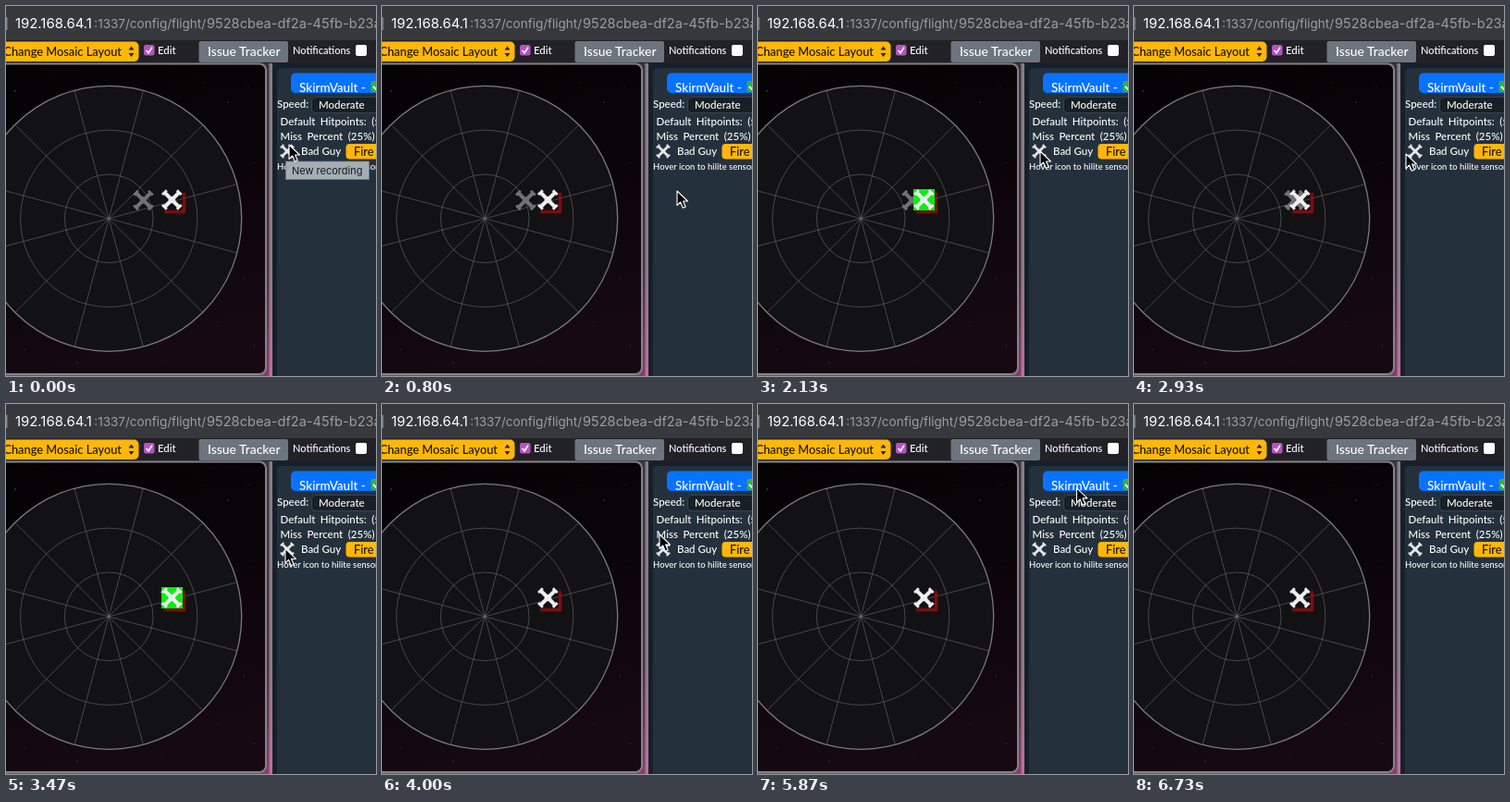
These frames come from a looping animation (400x400 px, 6.79 s). An HTML page:

```html
<!DOCTYPE html>
<html lang="en">
<head>
<meta charset="utf-8">
<title>Radar hover</title>
<style>
  html, body { margin: 0; width: 100%; height: 100%; overflow: hidden; background: #000; }
  svg { display: block; width: 100vw; height: 100vh; }
  text { font-family: Lato, "Open Sans", sans-serif; font-weight: 500; fill: #fff; white-space: pre; }
  .ui { font-family: Inter, Roboto, sans-serif; font-weight: 400; }
  .row { font-size: 11.5px; }
  .wide { word-spacing: 2.6px; }
</style>
</head>
<body>
<svg viewBox="0 0 400 400">
  <defs>
    <linearGradient id="space" x1="0" y1="0" x2="0.25" y2="1">
      <stop offset="0" stop-color="#040304"/>
      <stop offset="0.5" stop-color="#0a0408"/>
      <stop offset="1" stop-color="#160912"/>
    </linearGradient>
    <linearGradient id="gap" x1="0" y1="0" x2="0" y2="1">
      <stop offset="0" stop-color="#3a373b"/>
      <stop offset="0.65" stop-color="#4c3243"/>
      <stop offset="1" stop-color="#8c3d6c"/>
    </linearGradient>
    <linearGradient id="edge" x1="0" y1="0" x2="0" y2="1">
      <stop offset="0" stop-color="#828084"/>
      <stop offset="0.65" stop-color="#8d7a86"/>
      <stop offset="1" stop-color="#b8709c"/>
    </linearGradient>
    <filter id="soft" x="-30%" y="-30%" width="160%" height="160%">
      <feGaussianBlur stdDeviation="0.8"/>
    </filter>
    <clipPath id="titleClip"><rect x="308" y="73" width="92" height="21"/></clipPath>
    <g id="ship">
      <path d="M-8-8L8 8M8-8L-8 8" stroke-width="4"/>
      <path d="M-10.3-5.5L-5.5-10.3M10.3-5.5L5.5-10.3M-10.3 5.5L-5.5 10.3M10.3 5.5L5.5 10.3" stroke-width="2.8"/>
      <path d="M0-4L4 0L0 4L-4 0Z" fill="currentColor" stroke="none"/>
    </g>
  </defs>

  <!-- browser bar -->
  <rect width="400" height="38" fill="#37383c"/>
  <rect y="12" width="1.5" height="14" fill="#85868a"/>
  <g class="url" fill="#9b9da2">
    <text class="ui" x="10" y="24" font-size="14.9">192.168.64.1</text>
    <text class="ui" x="95.3" y="24" font-size="13.5" style="fill:#9b9da2">:1337/config/flight/</text>
    <text class="ui" x="217" y="24" font-size="14.6" style="fill:#9b9da2">9528cbea-df2a-45fb-b23a</text>
  </g>

  <!-- toolbar -->
  <rect y="37" width="400" height="26" fill="#222125"/>
  <rect x="-10" y="38.5" width="153.5" height="21.5" rx="5" fill="#ffb70a"/>
  <text x="125" y="54" font-size="12.8" text-anchor="end" style="fill:#191304">Change Mosaic Layout</text>
  <path d="M132.5 47.5L135.5 43.5L138.5 47.5ZM132.5 51L135.5 55L138.5 51Z" fill="#2a2108"/>
  <rect x="149" y="42" width="11.5" height="11.5" rx="2" fill="#b552c2"/>
  <path d="M151.7 48L154 50.8L158 44.6" fill="none" stroke="#fff" stroke-width="1.7"/>
  <text x="164" y="52" font-size="11.4">Edit</text>
  <rect x="208.5" y="38" width="96.5" height="23" rx="2" fill="#6c757d"/>
  <text x="218" y="54.3" font-size="13.9">Issue Tracker</text>
  <text x="310" y="52" font-size="11">Notifications</text>
  <rect x="378" y="42" width="12" height="12" rx="2" fill="#fff"/>

  <!-- radar -->
  <rect y="62" width="290" height="338" fill="url(#gap)"/>
  <rect x="284.5" y="62" width="3.5" height="338" fill="url(#edge)"/>
  <rect x="-10" y="62.5" width="291" height="335.5" rx="7" fill="url(#space)" stroke="#858387" stroke-width="2"/>
  <g id="stars" fill="#a04583"></g>
  <g id="radar" transform="translate(111.2 229.8)" fill="none" stroke="#656468" stroke-width="0.65">
    <circle r="143.5" fill="#121114" stroke="#7b7a7d" stroke-width="1.3"/>
    <circle r="1.2" fill="#aaa" stroke="none"/>
  </g>
  <use id="ghost" href="#ship" color="#727275" stroke="#727275"/>
  <path d="M191 202H194V224H171V221H191Z" fill="#960808" filter="url(#soft)"/>
  <rect id="hilite" x="168" y="198" width="23" height="23" fill="#08ee12"/>
  <use href="#ship" x="179.3" y="209.5" color="#eee" stroke="#eee"/>

  <!-- side panel -->
  <rect x="288" y="62" width="112" height="338" fill="#16202a"/>
  <rect x="293" y="67" width="120" height="345" rx="5" fill="#24313d"/>
  <rect x="308" y="72.5" width="105" height="21.5" rx="5" fill="#0873ff"/>
  <g clip-path="url(#titleClip)">
    <text x="317" y="93" font-size="13.5">SkirmVault -</text>
    <rect x="394.5" y="81" width="12" height="12" rx="2" fill="#2fb344"/>
    <path d="M397 87L400 90L404 83" fill="none" stroke="#fff" stroke-width="1.8"/>
  </g>
  <text class="row" x="293" y="110">Speed:</text>
  <rect x="330.5" y="98.5" width="80" height="17" rx="4" fill="#182027" stroke="#38434d"/>
  <text class="row" x="338" y="111">Moderate</text>
  <text class="row wide" x="296.5" y="128.5">Default Hitpoints: (5</text>
  <text class="row wide" x="296.5" y="144.5">Miss Percent (25%)</text>
  <use href="#ship" transform="translate(304 157) scale(.69)" color="#e4e6e8" stroke="#e4e6e8"/>
  <text class="row" x="319" y="161">Bad Guy</text>
  <rect x="367.5" y="149" width="45" height="16.5" rx="4" fill="#ffb70a"/>
  <text x="376" y="161.5" font-size="12.8" style="fill:#191304">Fire</text>
  <text x="293" y="177" font-size="9.5">Hover icon to hilite sensor</text>

  <g id="tooltip">
    <rect x="302.5" y="168" width="90" height="19.5" fill="#a4adb4" stroke="#727d86" stroke-width="0.7"/>
    <text class="ui" x="309" y="181.5" font-size="11" style="fill:#171b20">New recording</text>
  </g>
  <path id="cursor" d="M0 0V15.5L3.7 12L6.3 18.2L9.2 17L6.6 11H11.5Z" fill="#050505" stroke="#fff" stroke-width="1.1" stroke-linejoin="round"/>
</svg>
<script>
const LOOP = 6790, STEP = 1000 / 15;
const byId = id => document.getElementById(id);

function add(parent, tag, attrs) {
  const el = document.createElementNS("http://www.w3.org/2000/svg", tag);
  for (const key in attrs) el.setAttribute(key, attrs[key]);
  parent.append(el);
}

for (const r of [47.8, 95.6]) add(byId("radar"), "circle", { r });
for (let i = 0; i < 12; i++) {
  const a = (15 + 30 * i) * Math.PI / 180;
  add(byId("radar"), "line", { x2: 143 * Math.cos(a), y2: 143 * Math.sin(a) });
}
const stars = [[46, 73], [262, 87], [240, 104], [268, 170], [214, 83], [257, 294], [230, 346],
  [77, 386], [20, 372], [168, 384], [268, 367], [10, 92]];
stars.forEach(([cx, cy], i) =>
  add(byId("stars"), "circle", { cx, cy, r: 0.6 + i % 3 * 0.2, opacity: 0.2 + i % 4 * 0.1 }));

// seconds, x, y of the pointer tip
const path = [
  [0, 306, 150], [0.2, 306, 150], [0.8, 319, 200], [1.3, 317, 195], [2, 305, 159], [2.13, 305, 157],
  [2.4, 304, 160], [2.93, 294, 160], [3.4, 302, 157], [4, 300, 141], [4.4, 303, 155], [5.13, 303, 166],
  [5.4, 306, 162], [5.9, 345, 90], [6.3, 410, 40], [6.8, 420, 30]
];

function pointerAt(s) {
  const i = Math.max(1, path.findIndex(p => p[0] > s));
  const [t0, x0, y0] = path[i - 1], [t1, x1, y1] = path[i];
  const u = (s - t0) / (t1 - t0), k = u * u * (3 - 2 * u);
  return [x0 + (x1 - x0) * k, y0 + (y1 - y0) * k];
}

const show = (id, on) => byId(id).setAttribute("visibility", on ? "visible" : "hidden");

function render(ms) {
  const s = Math.floor(ms / STEP + 0.05) * STEP / 1000;
  const [x, y] = pointerAt(s);
  const ghostX = 148.5 + 8.5 * s;
  byId("cursor").setAttribute("transform", `translate(${x} ${y})`);
  byId("ghost").setAttribute("transform", `translate(${ghostX} 210)`);
  show("ghost", ghostX < 179.3);
  show("tooltip", s < 0.3);
  show("hilite", s > 0.3 && x > 296 && x < 312 && y > 149 && y < 165);
}

const start = performance.now();
function tick() {
  render((performance.now() - start) % LOOP);
  requestAnimationFrame(tick);
}
tick();
</script>
</body>
</html>
```
